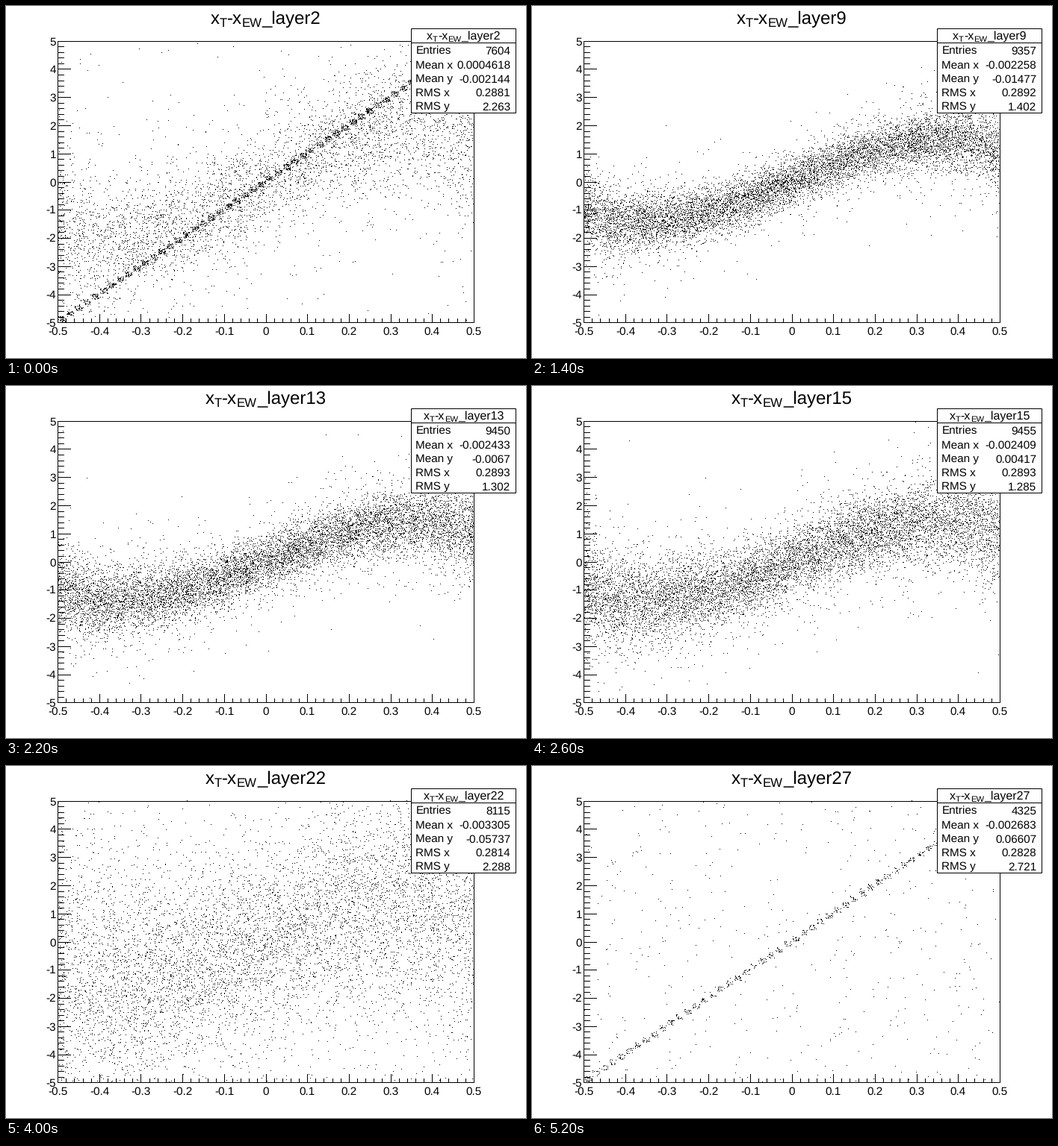
A matplotlib script for the animation above (5300 ms loop, 696 by 472 pixels).

```python
import numpy as np
import matplotlib.pyplot as plt
from matplotlib.animation import FuncAnimation
from matplotlib.patches import Rectangle

W, H, DPI = 696, 472, 64
PX = 72 / DPI  # points per pixel
TICK_MS, HOLD = 100, 2
FIRST, LAST = 2, 27
FRAMES = 53

plt.rcParams.update({"font.family": "Liberation Sans", "text.hinting": "none"})
fig = plt.figure(figsize=(W / DPI, H / DPI), dpi=DPI, facecolor="white")
ax = fig.add_axes([0, 0, 1, 1])
ax.set(xlim=(0, W), ylim=(H, 0))
ax.axis("off")

LEFT, RIGHT, TOP, BOTTOM = 0.1 * W, 0.9 * W, 0.1 * H, 0.9 * H

# Readings shown in the box at a few layers; the rest lie between them.
NAMES = ["Entries", "Mean x", "Mean y", "RMS x", "RMS y"]
READINGS = {
    2: (7604, .0004618, -.002144, .2881, 2.263),
    6: (9224, -.001957, -.01057, .2892, 1.526),
    11: (9446, -.002458, -.01757, .2892, 1.319),
    15: (9455, -.002409, .00417, .2893, 1.285),
    19: (9417, -.00298, .01784, .2881, 1.771),
    22: (8115, -.003305, -.05737, .2814, 2.288),
    27: (4325, -.002683, .06607, .2828, 2.721),
}


def readings(layer):
    columns = zip(*READINGS.values())
    vals = [np.interp(layer, list(READINGS), col) for col in columns]
    return [f"{vals[0]:.0f}"] + [f"{v:.4g}" for v in vals[1:]]


def to_px(x, y):
    return (np.floor(LEFT + (RIGHT - LEFT) * (x + 0.5)),
            np.floor(BOTTOM - (BOTTOM - TOP) * (y + 5) / 10))


def line(x0, y0, x1, y1, z=2):
    ax.plot(np.floor([x0, x1]), np.floor([y0, y1]), color="black", lw=PX, zorder=z)


def label(x, y, s, size=15.3, ha="left", z=3):
    return ax.text(x, y, s, fontsize=size * PX, ha=ha, va="baseline", zorder=z)


def advance(s, size):
    def ink(text):
        t = label(0, 0, text, size)
        w = t.get_window_extent().width
        t.remove()
        return w
    return ink(f"|{s}|") - ink("||")


class Heading:
    """Centred x_T-x_EW_layerN with real subscripts."""

    def __init__(self, cx, base, size, z):
        self.cx = cx
        self.sizes = [size, 0.7 * size] * 2 + [size]
        self.parts = [label(0, base + (i % 2) * 0.2 * size, s, sz, z=z)
                      for i, (s, sz) in enumerate(zip(["x", "T", "-x", "EW", ""],
                                                      self.sizes))]

    def show(self, layer):
        self.parts[-1].set_text(f"_layer{layer}")
        widths = [advance(p.get_text(), s) for p, s in zip(self.parts, self.sizes)]
        x = self.cx - sum(widths) / 2
        for part, w in zip(self.parts, widths):
            part.set_x(x)
            x += w


def scatter(layer):
    rng = np.random.default_rng(100 + layer)
    inner, outer = np.exp(-(layer - FIRST) / 1.5), np.exp(-(LAST - layer) / 1.5)
    n_band = int(9300 * max(0, 1 - (abs(layer - 13) / 13) ** 4))
    n_diag = int(1900 * inner + 800 * outer)
    n_noise = int(130 * inner + 480 / (1 + np.exp(20.5 - layer)))

    # S-shaped band, narrowest near layer 10, with wider tails
    sigma = 0.47 + 0.01 * (layer - 10) ** 2
    amp = 1.4 + 0.7 * np.exp(-(layer - FIRST) / 3)
    x = rng.uniform(-0.5, 0.5, n_band)
    spread = sigma * (0.85 + 1.8 * x ** 2)
    spread *= np.where(rng.random(n_band) < 0.13, 2.1, 1)
    edge = 1 - 0.25 * np.clip((np.abs(x) - 0.44) / 0.06, 0, 1)
    y = amp * edge * np.sin(np.pi * x / 0.75) + rng.normal(0, 1, n_band) * spread

    # blocks along the diagonal
    c = -0.49 + 0.02 * rng.integers(0, 50, n_diag)
    dx = c + rng.uniform(-0.0085, 0.0085, n_diag)
    dy = 10 * c + rng.uniform(-0.1, 0.1, n_diag)

    x = np.concatenate([x, dx, rng.uniform(-0.5, 0.5, n_noise)])
    y = np.concatenate([y, dy, rng.uniform(-5, 5, n_noise)])
    keep = np.abs(y) < 5
    return to_px(x[keep], y[keep])


# Frame, ticks and tick labels
for x in (LEFT, RIGHT):
    line(x, TOP, x, BOTTOM)
for y in (TOP, BOTTOM):
    line(LEFT, y, RIGHT, y)
for k in range(51):
    major = k % 5 == 0
    x, y = to_px(-0.5 + 0.02 * k, -5 + 0.2 * k)
    line(x, BOTTOM, x, BOTTOM - (11.3 if major else 5.6))
    line(LEFT, y, LEFT + (16.7 if major else 8.3), y)
    if major:
        v = k // 5 - 5
        label(x, 440.5, f"{v / 10:g}", ha="center")
        label(67, y + 5.5, f"{v}", ha="right")

dots, = ax.plot([], [], ",", color="black", zorder=1)

# Statistics box
ax.add_patch(Rectangle((542, 30), 140, 113, fc="white", ec="black",
                       lw=PX, zorder=4))
line(542, 49, 682, 49, z=5)
values = []
for i, name in enumerate(NAMES):
    base = 64.8 + 18.8 * i
    label(548.5, base - name.endswith("y"), name, z=5)
    values.append(label(675.5, base, "", ha="right", z=5))

headings = [Heading(347.5, 23.6, 24, 3), Heading(612.5, 44.8, 16, 5)]


def update(i):
    layer = min(FIRST + i // HOLD, LAST)
    dots.set_data(*scatter(layer))
    for heading in headings:
        heading.show(layer)
    for text, s in zip(values, readings(layer)):
        text.set_text(s)
    return [dots]


anim = FuncAnimation(fig, update, frames=FRAMES, interval=TICK_MS,
                     init_func=lambda: update(0), repeat=True,
                     repeat_delay=0, blit=False)
plt.show()
```
